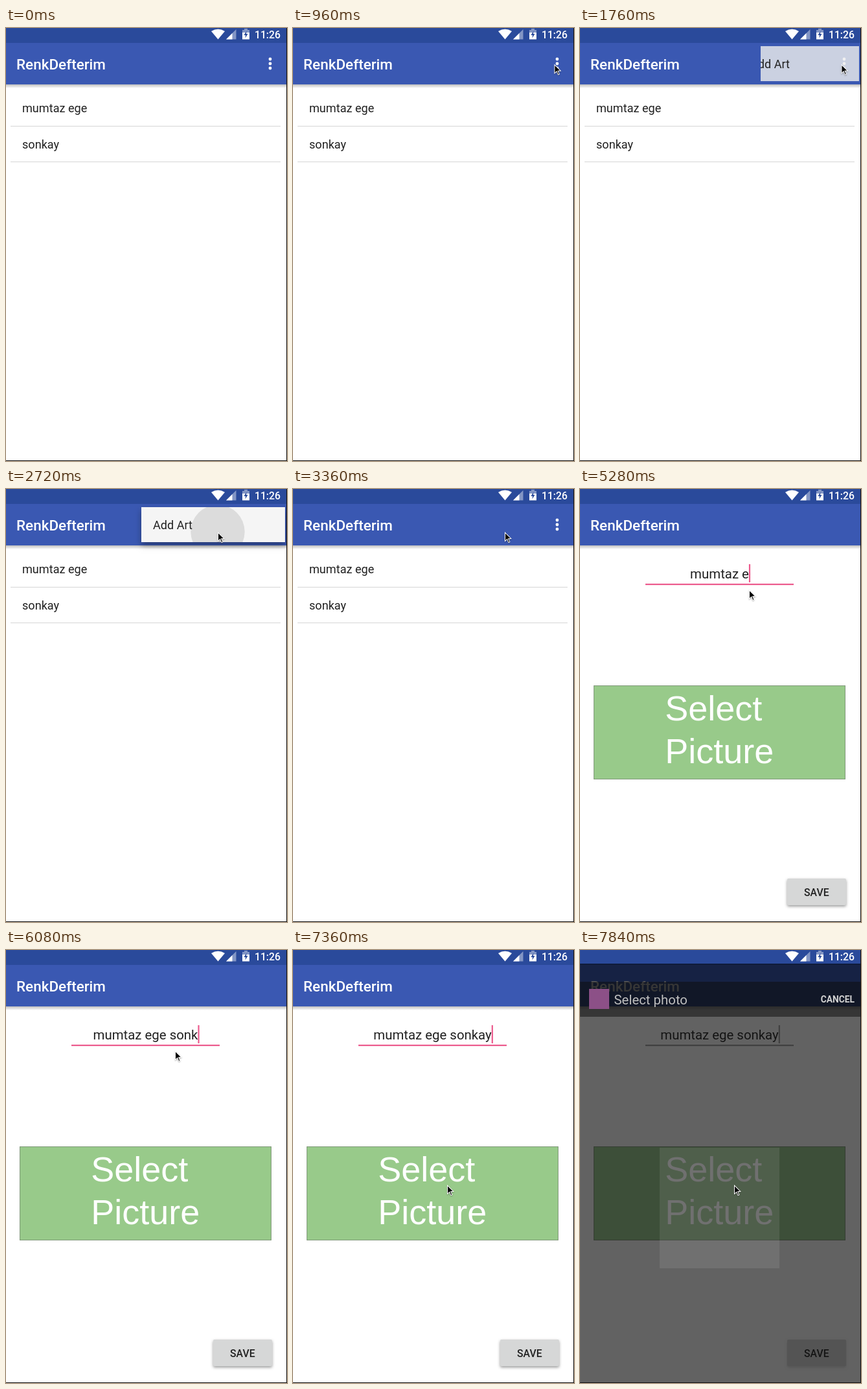
An HTML page with a canvas for the animation above (8 s loop, 434x668 px).

```html
<!DOCTYPE html>
<html lang="tr">
<head>
<meta charset="utf-8">
<title>RenkDefterim</title>
<style>
html, body { margin: 0; width: 100%; height: 100%; overflow: hidden; background: #fff; }
canvas { display: block; width: 434px; height: 668px; }
</style>
</head>
<body>
<canvas id="stage" width="434" height="668"></canvas>
<script>
const W = 434, H = 668, LOOP = 8000, STEP = 160;
const ctx = document.getElementById('stage').getContext('2d');
const BLUE = '#3a58b2', STATUS = '#2a4a9b', PINK = '#ec5a8d', INK = '#212121';
const APP = 'RenkDefterim', FIRST = 'mumtaz ege', LAST = 'sonkay';
const FULL = FIRST + ' ' + LAST;

const MENU_OPEN = 1760, TAP = 2720, MENU_FADE = 3200, MENU_GONE = 3360;
const FORM_IN = 3520, FORM_READY = 3680, FIELD_TAP = 4320;
const TYPE_FROM = 4480, TYPE_TO = 6400, PICKER = 7840;

const MOVES = [
  { from: 160, to: 960, x: 403.5, y: 55.5 },
  { from: 1920, to: 2400, x: 327, y: 66 },
  { from: 3680, to: 4000, x: 261, y: 155 },
  { from: 6560, to: 6880, x: 238, y: 362 },
];

const roboto = (size, weight = 400) => `${weight} ${size}px Roboto, sans-serif`;
const progress = (t, from, to) => Math.max(0, Math.min(1, (t - from) / (to - from)));
const ease = k => k * k * (3 - 2 * k);

function box(x, y, w, h, fill) {
  ctx.fillStyle = fill;
  ctx.fillRect(x, y, w, h);
}

function disc(x, y, r, fill) {
  ctx.beginPath();
  ctx.arc(x, y, r, 0, 2 * Math.PI);
  ctx.fillStyle = fill;
  ctx.fill();
}

function poly(points, fill) {
  ctx.beginPath();
  points.forEach(([x, y]) => ctx.lineTo(x, y));
  ctx.closePath();
  ctx.fillStyle = fill;
  ctx.fill();
}

function text(str, x, y, font, fill, align = 'left') {
  ctx.font = font;
  ctx.textAlign = align;
  ctx.fillStyle = fill;
  ctx.fillText(str, x, y);
}

function layer(alpha, draw) {
  ctx.save();
  ctx.globalAlpha = alpha;
  draw();
  ctx.restore();
}

function shadow(blur, dy, alpha) {
  ctx.shadowColor = `rgba(0,0,0,${alpha})`;
  ctx.shadowBlur = blur;
  ctx.shadowOffsetY = dy;
}

function statusBar() {
  const faint = 'rgba(255,255,255,.42)';
  box(0, 0, W, 23, STATUS);
  ctx.beginPath();
  ctx.moveTo(327.5, 17.5);
  ctx.lineTo(317, 5);
  ctx.quadraticCurveTo(327.5, -1.5, 338, 5);
  ctx.fillStyle = '#fff';
  ctx.fill();
  poly([[340, 17.5], [355.5, 17.5], [355.5, 2]], faint);
  poly([[340, 17.5], [349.5, 17.5], [349.5, 8]], '#fff');
  box(368, 1, 5, 2, faint);
  box(365, 3, 11, 4, faint);
  box(365, 7, 11, 10.5, '#fff');
  poly([[371.5, 4.5], [367.5, 11], [370, 11], [369.5, 15.5], [373.5, 9], [371, 9]], STATUS);
  text('11:26', 424, 16, roboto(15.8, 500), '#fff', 'right');
}

function toolbar() {
  const g = ctx.createLinearGradient(0, 87, 0, 93);
  g.addColorStop(0, 'rgba(0,0,0,.25)');
  g.addColorStop(1, 'rgba(0,0,0,0)');
  box(0, 87, W, 6, g);
  box(0, 23, W, 64, BLUE);
  text(APP, 16, 64, roboto(22.5, 500), '#fff');
}

function list() {
  box(0, 0, W, H, '#fff');
  toolbar();
  for (let i = -1; i <= 1; i++) disc(408, 55 + i * 7, 2.4, '#fff');
  [FIRST, LAST].forEach((name, i) => {
    text(name, 25, 130 + i * 55.5, roboto(18.1), INK);
    box(7, 151 + i * 55, 417, 1, '#d6d6d6');
  });
}

function menu(t) {
  if (t < MENU_OPEN || t >= MENU_GONE) return;
  const rest = 1 - progress(t, MENU_OPEN - STEP, MENU_OPEN + STEP);
  const left = 209 + 140 * rest, grey = 252 - 30 * rest;
  layer(t < MENU_FADE ? 1 : 0.4, () => {
    ctx.save();
    if (!rest) shadow(9, 5, 0.35);
    box(left, 28, 431 - left, 54, `rgba(${grey},${grey},${grey},${1 - 0.38 * rest})`);
    ctx.restore();
    ctx.beginPath();
    ctx.rect(left, 28, 431 - left, 54);
    ctx.clip();
    const press = progress(t, TAP - STEP, TAP + 2 * STEP);
    box(209, 28, 222, 54, `rgba(0,0,0,${0.08 * press})`);
    disc(327, 66, 125 * press, 'rgba(0,0,0,.1)');
    text('Add Art', 227 + 72 * rest, 62, roboto(18.1), INK);
  });
}

function typed(t) {
  return FULL.slice(0, Math.ceil(FULL.length * progress(t, TYPE_FROM, TYPE_TO)));
}

// blinks while idle, stays lit while typing
function caretOn(t) {
  const idle = t < FIELD_TAP ? t - FORM_IN : Math.max(0, t - TYPE_TO);
  return Math.floor(idle / 480) % 2 === 0;
}

function form(t, focused) {
  const accent = focused ? PINK : '#a0a0a0';
  const name = typed(t), font = roboto(20.4);
  box(0, 0, W, H, '#fff');
  toolbar();
  text(name || 'Name', 215.5, 138, font, name ? INK : '#989898', 'center');
  box(101, 146, 229, 2.2, accent);
  if (!focused || caretOn(t)) {
    const end = name ? 215.5 + ctx.measureText(name).width / 2 : 215;
    box(end, 116, 2.2, 28, accent);
  }

  box(21, 303, 389, 145, '#80987a');
  box(22, 304, 387, 143, '#98ca8a');
  ['Select', 'Picture'].forEach((word, i) => {
    text(word, 131.2, 357 + i * 65.5, '54px "Liberation Sans", Arial, sans-serif', '#fff');
  });

  ctx.save();
  shadow(4, 2, focused ? 0.4 : 0.15);
  ctx.beginPath();
  ctx.roundRect(320, 601, 91, 41, 2);
  ctx.fillStyle = '#d6d7d7';
  ctx.fill();
  ctx.restore();
  text('SAVE', 365.3, 627.5, roboto(15.8, 500), INK, 'center');
}

function picker() {
  box(0, 21, W, H - 21, 'rgba(0,0,0,.615)');
  box(0, 87, W, H - 87, 'rgba(105,105,105,.08)');
  box(0, 49, W, 54, 'rgba(14,14,14,.52)');
  box(123, 305, 185, 186, 'rgba(255,255,255,.09)');
  box(14, 60, 31, 31, '#8c5087');
  text('Select photo', 52.5, 84, roboto(20.4), '#bebebe');
  text('CANCEL', 424, 81, roboto(13.8, 700), '#d2d2d2', 'right');
}

function pointer(t) {
  if (t < MOVES[0].from) return;
  let x = 416, y = 580;
  for (const m of MOVES) {
    const k = ease(progress(t, m.from, m.to));
    x += (m.x - x) * k;
    y += (m.y - y) * k;
  }
  ctx.save();
  ctx.translate(x, y);
  ctx.save();
  shadow(2, 1, 0.35);
  poly([[0, 0], [0, 15.5], [3.5, 12.3], [5.8, 17.3], [8.5, 16], [6.3, 11.2], [11, 11]], '#fff');
  ctx.restore();
  poly([[1, 2.4], [1, 13.2], [3.8, 10.6], [6.2, 16], [7.3, 15.5], [4.9, 10.2], [8.7, 10]], '#000');
  ctx.restore();
}

function render(t) {
  const photo = t >= PICKER;
  if (t < FORM_READY) {
    list();
    menu(t);
    if (t >= FORM_IN) {
      layer(0.6, () => {
        ctx.translate(0, 20);
        form(t, true);
      });
    }
  } else {
    form(t, !photo);
  }
  statusBar();
  if (photo) picker();
  box(W - 1, 0, 1, H, '#111');
  box(0, H - 1, W, 1, '#111');
  pointer(t);
}

function tick(now) {
  render(Math.floor((now % LOOP) / STEP) * STEP);
  requestAnimationFrame(tick);
}
render(0);
requestAnimationFrame(tick);
</script>
</body>
</html>
```
